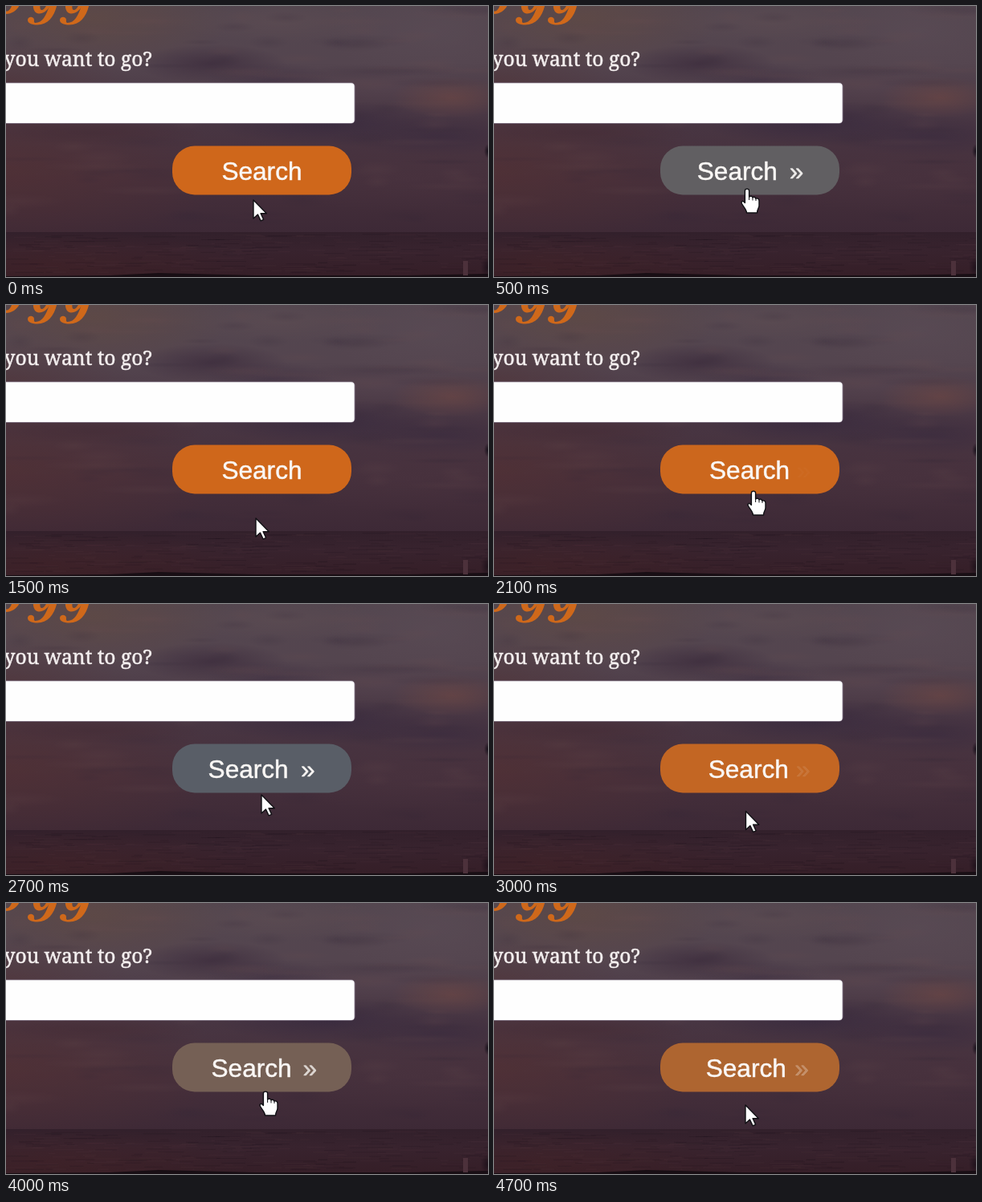
An HTML page with a canvas that plays this animation: 600x338 px, repeating every 4800 ms.

```html
<!DOCTYPE html>
<html lang="en">
<head>
<meta charset="utf-8">
<title>Search button</title>
<style>
  html, body { margin: 0; width: 100%; height: 100%; overflow: hidden; background: #46333f; }
  canvas { display: block; width: 600px; height: 338px; }
</style>
</head>
<body>
<canvas id="stage" width="600" height="338"></canvas>
<script>
const W = 600, H = 338, LOOP = 4800, STEP = 100, FADE = 500;
const ctx = document.getElementById('stage').getContext('2d');

// Pointer hotspot: time, x, y
const path = [
  [0, 308, 242], [200, 311, 233], [500, 315, 228], [800, 313, 229],
  [980, 309, 236], [1100, 306, 254], [1200, 306, 263], [1400, 309, 266],
  [1500, 311, 266], [1600, 311, 266], [1700, 313, 263], [1900, 319, 249],
  [2080, 323, 234], [2100, 323, 232], [2300, 324, 227], [2500, 322, 228],
  [2700, 318, 238], [2900, 315, 254], [3100, 312, 263], [3300, 313, 263],
  [3400, 313, 263], [3500, 314, 254], [3770, 322, 235], [4000, 323, 235],
  [4200, 322, 230], [4400, 317, 230], [4500, 315, 237], [4600, 313, 246],
  [4700, 313, 252], [4800, 313, 252]
];
const hovers = [[170, 985], [2080, 2690], [3770, 4485]];

const mix = (a, b, p) => a + (b - a) * p;
const clamp = v => Math.min(1, Math.max(0, v));

// CSS "ease": cubic-bezier(.25, .1, .25, 1)
function ease(x) {
  if (x <= 0 || x >= 1) return clamp(x);
  let lo = 0, hi = 1, u = 0.5;
  const bez = (a, b) => 3 * u * (1 - u) ** 2 * a + 3 * u * u * (1 - u) * b + u ** 3;
  for (let i = 0; i < 24; i++) {
    u = (lo + hi) / 2;
    if (bez(0.25, 0.25) < x) lo = u; else hi = u;
  }
  return bez(0.1, 1);
}

function pointerAt(t) {
  let i = 1;
  while (i < path.length - 1 && path[i][0] < t) i++;
  const a = path[i - 1], b = path[i], p = clamp((t - a[0]) / (b[0] - a[0]));
  return [mix(a[1], b[1], p), mix(a[2], b[2], p)];
}

function hoverAt(t) {
  let p = 0;
  for (const [enter, leave] of hovers) {
    if (t >= leave) p = 1 - ease((t - leave) / FADE);
    else if (t >= enter) p = ease((t - enter) / FADE);
  }
  return p;
}

function randomizer(seed) {
  return () => (seed = (seed * 16807) % 2147483647) / 2147483647;
}

function cloud(c, x, y, rx, ry, rgb, alpha) {
  c.save();
  c.translate(x, y);
  c.scale(rx, ry);
  const g = c.createRadialGradient(0, 0, 0, 0, 0, 1);
  g.addColorStop(0, `rgba(${rgb},${alpha})`);
  g.addColorStop(0.5, `rgba(${rgb},${alpha * 0.5})`);
  g.addColorStop(1, `rgba(${rgb},0)`);
  c.fillStyle = g;
  c.fillRect(-1, -1, 2, 2);
  c.restore();
}

function paintSunset() {
  const layer = document.createElement('canvas');
  layer.width = W;
  layer.height = H;
  const c = layer.getContext('2d'), rnd = randomizer(41);

  const sky = c.createLinearGradient(0, 0, 0, 283);
  [[0, '#53464f'], [0.25, '#54454f'], [0.5, '#483643'], [0.75, '#46303c'], [1, '#3d2936']]
    .forEach(([at, color]) => sky.addColorStop(at, color));
  c.fillStyle = sky;
  c.fillRect(0, 0, W, 283);

  cloud(c, 0, 205, 270, 110, '84,48,50', 0.6);
  cloud(c, 110, 15, 170, 65, '98,74,66', 0.65);
  cloud(c, 0, 95, 160, 50, '80,52,56', 0.6);
  cloud(c, 340, 20, 130, 26, '98,80,84', 0.4);
  cloud(c, 530, 30, 130, 60, '92,77,87', 0.5);
  cloud(c, 255, 72, 95, 24, '62,46,62', 0.85);
  cloud(c, 330, 92, 80, 22, '62,48,66', 0.6);
  cloud(c, 470, 100, 110, 24, '88,69,80', 0.5);
  cloud(c, 555, 114, 75, 26, '112,72,68', 0.6);
  cloud(c, 400, 146, 140, 28, '56,42,62', 0.85);
  cloud(c, 540, 162, 120, 25, '58,43,62', 0.7);
  cloud(c, 110, 158, 140, 16, '67,43,53', 0.55);
  cloud(c, 500, 215, 160, 45, '74,52,64', 0.4);
  for (let i = 0; i < 90; i++) {
    const tint = rnd() < 0.5 ? '48,36,52' : '104,76,78';
    cloud(c, rnd() * W, rnd() * 270, 15 + rnd() * 55, 3 + rnd() * 8, tint, 0.15);
  }

  const sea = c.createLinearGradient(0, 282, 0, H);
  sea.addColorStop(0, '#32202b');
  sea.addColorStop(0.4, '#38232e');
  sea.addColorStop(1, '#351e27');
  c.fillStyle = sea;
  c.fillRect(0, 282, W, H - 282);
  cloud(c, 60, 325, 240, 45, '72,36,38', 0.4);
  for (let i = 0; i < 240; i++) {
    c.fillStyle = rnd() < 0.5 ? 'rgba(28,16,26,.2)' : 'rgba(98,64,72,.12)';
    c.fillRect(rnd() * W, 284 + rnd() * 48, 8 + rnd() * 35, 1);
  }

  // Shore, post and the dark shape at the right edge
  c.fillStyle = '#180e14';
  c.beginPath();
  c.moveTo(0, 337);
  c.lineTo(130, 336);
  c.lineTo(190, 333);
  c.lineTo(310, 336);
  c.lineTo(500, 336);
  c.lineTo(W, 334);
  c.lineTo(W, H);
  c.lineTo(0, H);
  c.fill();
  c.fillStyle = '#4c313b';
  c.fillRect(569, 318, 6, 18);
  cloud(c, 600, 181, 5, 9, '22,15,25', 1);
  cloud(c, 600, 326, 9, 13, '24,14,23', 0.8);
  return layer;
}

function box(x, y, w, h, r, fill) {
  ctx.beginPath();
  ctx.roundRect(x, y, w, h, r);
  ctx.fillStyle = fill;
  ctx.fill();
}

// A hairline outline gives the lettering its slightly heavier weight
function text(str, x, y, font, color, align = 'left') {
  ctx.font = font;
  ctx.fillStyle = ctx.strokeStyle = color;
  ctx.textAlign = align;
  ctx.lineWidth = 0.5;
  ctx.fillText(str, x, y);
  ctx.strokeText(str, x, y);
}

// Lower ends of the italic heading, cut off by the top edge
const bowl = new Path2D('M34-4C33 4 36 9.5 41 9.5C48 9.5 53 4 57-4H52C49 2 47 5 44.5 5C42 5 42 1 43-4Z');
const tail = new Path2D('M64-4C61 12 53 23.5 39 23.5C31 23.5 27 21 27 17.5' +
  'C27 12.5 35 12.5 35 17.5C35 19 34.5 20 36 21C46 21.5 51 10 55-4Z');
const round = new Path2D('M-14-4C-12 5-7 10-1 10C8 10 15 5 18-4H8C7 2 4 6.5 1 6.5C-2 6.5-4 2-4-4Z');

function drawHeading() {
  ctx.fillStyle = '#cf681a';
  ctx.fill(round);
  for (const dx of [0, 40]) {
    ctx.save();
    ctx.translate(dx, 0);
    ctx.fill(bowl);
    ctx.fill(tail);
    ctx.restore();
  }
}

function drawButton(p) {
  const sans = '31.6px "Liberation Sans", Arial, sans-serif';
  const rgb = [[207, 103, 27], [88, 94, 104]];
  const color = rgb[0].map((v, i) => Math.round(mix(v, rgb[1][i], p)));
  box(207, 174.5, 223, 61, 28, `rgb(${color})`);
  text('Search', mix(268.4, 251.4, p), 217, sans, '#faf7f5');
  ctx.globalAlpha = p;
  text('»', mix(377, 367, p), 217, sans, '#faf7f5');
  ctx.globalAlpha = 1;
}

const arrow = new Path2D('M0 0V17L4 13.3L6.7 19L9.3 17.9L6.7 12.3H12Z');
const hand = new Path2D('M-2.6 2.4C-2.6-.7 2.6-.7 2.6 2.4V10C4 8.7 6.5 9.2 7 10.8' +
  'C8.5 9.8 10.5 10.5 11 12.2C13 11.3 15 12.5 15 15V21C15 24 12.5 25.5 12.5 30H-.5' +
  'C-.5 26-3.5 24-6.5 18.5C-8 15.5-5 14-2.6 17.5Z');
const knuckles = new Path2D('M2.6 10V14M7 11V14.5M11 12V15');

function drawPointer(x, y, over) {
  ctx.save();
  ctx.translate(x, y);
  if (!over) ctx.scale(1.36, 1.36);
  ctx.lineJoin = 'round';
  ctx.fillStyle = '#fff';
  ctx.strokeStyle = '#101014';
  ctx.lineWidth = over ? 1.4 : 1;
  const shape = over ? hand : arrow;
  ctx.fill(shape);
  ctx.stroke(shape);
  ctx.lineWidth = 1;
  if (over) ctx.stroke(knuckles);
  ctx.restore();
}

const sunset = paintSunset();

function draw(t) {
  ctx.drawImage(sunset, 0, 0);
  drawHeading();
  text('Where do you want to go?', 182, 75, '24.6px "Noto Serif", serif', '#f4efef', 'right');

  box(-20, 95.5, 454.5, 51.2, 5, '#85798a');
  box(-20, 96.2, 453.6, 49.8, 4, '#fefefe');
  drawButton(hoverAt(t));

  const [x, y] = pointerAt(t);
  drawPointer(x, y, hovers.some(([enter, leave]) => t >= enter && t < leave));
}

const start = performance.now();
function tick() {
  const t = (performance.now() - start) % LOOP;
  draw(Math.floor(t / STEP) * STEP);
  requestAnimationFrame(tick);
}
tick();
</script>
</body>
</html>
```
